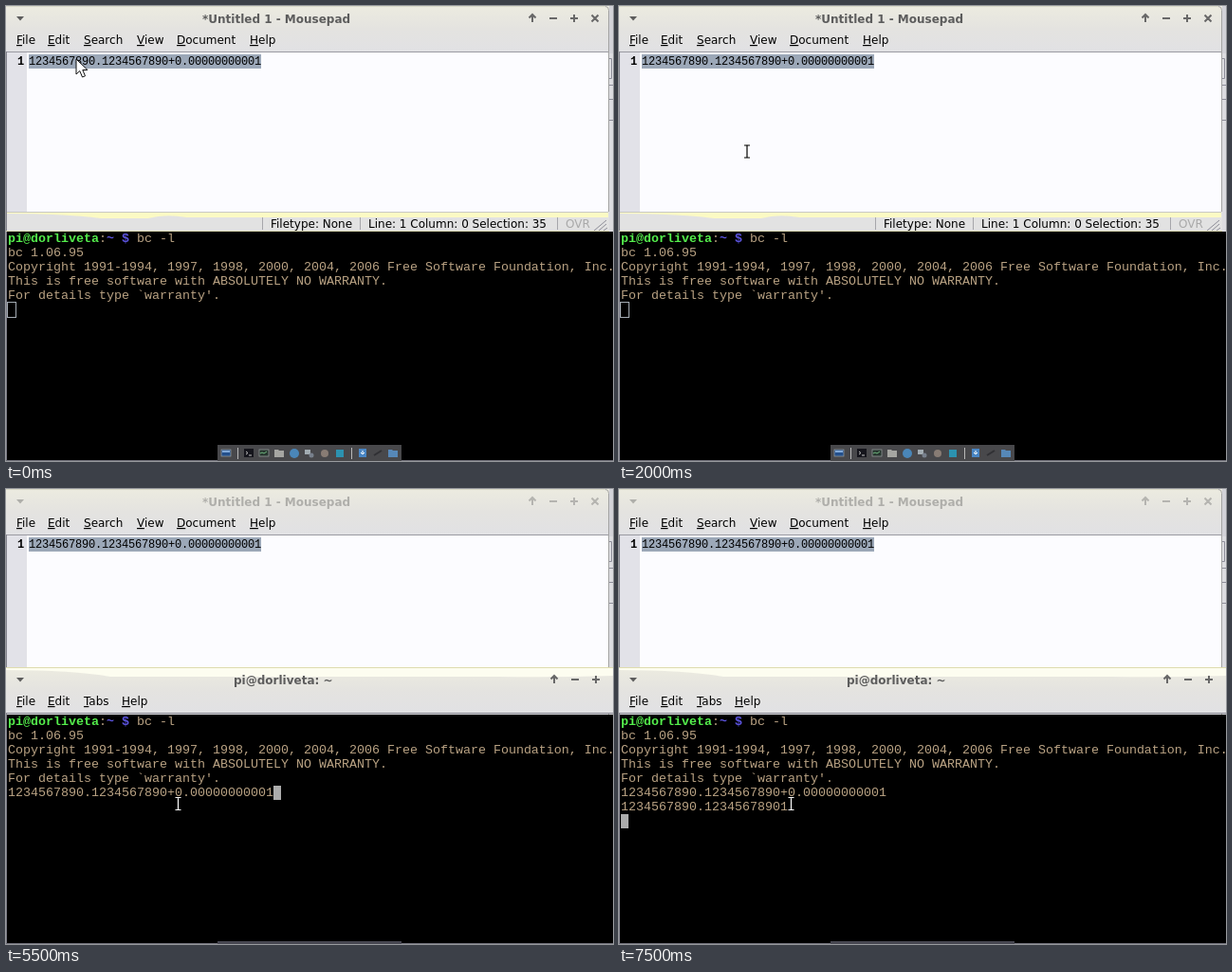
Recreate the animation shown at these times as an HTML page. Size 640 by 480 pixels, loop 8 s.

```html
<!DOCTYPE html>
<html lang="en">
<head>
<meta charset="utf-8">
<title>Copy and paste into bc</title>
<style>
html, body { margin: 0; width: 100%; height: 100%; overflow: hidden; background: #000; }
svg { display: block; width: 640px; height: 480px; }
text { white-space: pre; font: 12px "DejaVu Sans", sans-serif; }
.title { font-weight: bold; }
.mono { font: 13.333px "Liberation Mono", monospace; fill: #b9a283; }
.code { font: 12px "Liberation Mono", monospace; letter-spacing: -.2px; }
.b { font-weight: bold; }
.u { text-decoration: underline; }
.dim { fill: #a9a9a9; }
.sel { fill: #fff; }
</style>
</head>
<body>
<svg id="stage" viewBox="0 0 640 480"></svg>
<script>
const stage = document.getElementById('stage');

const rect = (x, y, w, h, fill, more = '') =>
  `<rect x="${x}" y="${y}" width="${w}" height="${h}" fill="${fill}" ${more}/>`;
const path = (d, fill, more = '') => `<path d="${d}" fill="${fill}" ${more}/>`;
const line = (d, stroke, width = 1) =>
  path(d, 'none', `stroke="${stroke}" stroke-width="${width}"`);
const circle = (x, y, r, fill) => `<circle cx="${x}" cy="${y}" r="${r}" fill="${fill}"/>`;
const text = (x, y, s, cls = '', more = '') =>
  `<text x="${x}" y="${y}" class="${cls}" ${more}>${s}</text>`;
// An underscore marks the underlined shortcut letter.
const label = (x, y, s, cls) => text(x, y, s.replace(/_(.)/, '<tspan class="u">$1</tspan>'), cls);
const group = (id, ...parts) => `<g id="${id}">${parts.join('')}</g>`;
const row = (y, items) => items.map(([x, s]) => label(x, y, s)).join('');

const upArrow = (x, y) => `M${x} ${y + 4}v-8m-3.5 3.5l3.5-3.5 3.5 3.5`;
const minus = (x, y) => `M${x - 4} ${y}h8`;
const plus = (x, y) => `M${x - 4} ${y}h8m-4-4v8`;
const cross = (x, y) => `M${x - 3.5} ${y - 3.5}l7 7m0-7l-7 7`;
const dropDown = y => path(`M11 ${y - 2}h8l-4 4.5z`, '#5c5c5c');

const sum = '1234567890.1234567890+0.00000000001';

function editor() {
  const buttons = upArrow(555, 13) + minus(577, 13) + plus(599, 13) + cross(621, 13);
  return [
    rect(0, 0, 640, 238, '#dcdce0'),
    rect(636, 0, 4, 50, '#d2d2d8'),
    line('M636 55.5h2.5v21H636M636 83.5h4M636 98.5h4M636 120.5h4', '#8c8c98'),
    rect(0, 0, 636, 49, 'url(#bar)'),
    line('M0 .5H632', '#d8d8c8'),
    line('M632 .5q3.5 0 3.5 4V238', '#a4a4a4'),
    group('editorTitle',
      dropDown(13),
      text(207, 18, '*Untitled 1 - Mousepad', 'title', 'fill="#5c5c5c"'),
      line(buttons, '#686868', 2)),
    row(40, [[11, '_File'], [44, '_Edit'], [82, '_Search'], [138, '_View'],
      [180, '_Document'], [257, '_Help']]),
    line('M0 48.5H635', '#9a9aa2'),
    rect(1, 49, 634, 169, '#fcfcff'),
    rect(1, 49, 21, 169, '#e2e2e8'),
    line('M.5 48V238', '#85858f'),
    rect(24, 51, 245, 15, '#9ca8b8'),
    text(12, 62, '1', 'code b'),
    text(24, 62, sum, 'code')
  ].join('');
}

const statusBar = () => [
  rect(1, 217, 635, 21, '#e2e2e2'),
  path('M1 218H635V223H190Q168 219 150 224L100 224Q60 219 1 219z', '#fcfac4'),
  line('M1 217.5H635', '#c8c8c4'),
  line('M270.5 223V236M373.5 223V236M581.5 223V236', '#a6a6aa'),
  text(279, 234, 'Filetype: None'),
  text(382, 234, 'Line: 1 Column: 0 Selection: 35'),
  text(590, 234, 'OVR', 'dim'),
  line('M620 237l13-11M625 237l8-7M630 237l4-3', '#8e8e98'),
  line('M0 237.5H636', '#d8d6b0')
].join('');

const termBar = () => [
  rect(0, 189, 640, 48, 'url(#bar)'),
  path('M0 189H640V197Q580 199 520 198L110 198Q70 191 0 191z', '#fdfdf0'),
  line('M0 188.5H640', '#dedcae'),
  dropDown(201),
  text(240, 206, 'pi@dorliveta: ~', 'title', 'fill="#5c5c5c"'),
  line(upArrow(578, 201) + minus(600, 201) + plus(622, 201), '#686868', 2),
  row(228, [[11, '_File'], [44, '_Edit'], [82, '_Tabs'], [122, '_Help']]),
  line('M0 236.5H640', '#85858f')
].join('');

function terminal() {
  const prompt = '<tspan class="b" fill="#54ee4c">pi@dorliveta</tspan>:' +
    '<tspan class="b" fill="#5c54e0">~ $</tspan> bc -l';
  const lines = [prompt, 'bc 1.06.95',
    'Copyright 1991-1994, 1997, 1998, 2000, 2004, 2006 Free Software Foundation, Inc.',
    'This is free software with ABSOLUTELY NO WARRANTY.',
    "For details type `warranty'."];
  return rect(0, 238, 640, 242, '#000') +
    lines.map((s, i) => text(2, 249 + 15 * i, s, 'mono')).join('') +
    group('pasted', text(2, 324, sum, 'mono')) +
    group('result', text(2, 339, '1234567890.12345678901', 'mono')) +
    line('M.5 238V480', '#7c7c88') + line('M0 479.5H640', '#6c6c76');
}

function dock() {
  const folder = (x, fill) => path(`M${x - 5} 468h4l1 1h5v7h-10z`, fill);
  const screen = (x, fill) => rect(x - 5, 468, 10, 7, fill, 'stroke="#9aa0a0" stroke-width=".7"');
  return [
    rect(223, 463, 194, 17, '#48484b'),
    line('M244.5 466V478M364.5 466V478', '#b8b8b8'),
    screen(232, '#24508c'), rect(228, 469, 8, 2, '#80a8d8'),
    rect(251, 467, 10, 9, '#15151c'), line('M253 470l2 1.5-2 1.5M256 474h3', '#c0c0c0'),
    screen(272, '#26352e'), line('M268 472l2-1 2 1 3-2', '#70b880'),
    folder(288, '#a6a6a2'),
    circle(304, 472, 5, '#4a86b8'),
    rect(315, 468, 6, 5, '#a2acb2'), circle(322, 474, 2.5, '#78808c'),
    circle(336, 472, 4, '#887c74'),
    rect(348, 468, 8, 8, '#2c92b0'),
    rect(372, 467, 8, 9, '#4a86c4'), line('M376 469v4m-2-2l2 2 2-2', '#fff'),
    line('M388 474l8-5', '#303034', 2),
    folder(408, '#5688b8')
  ].join('');
}

function contextMenu() {
  const items = [[67, '_Undo'], [89, '_Redo', 'dim'], [118, 'Cu_t'], [160, '_Paste'],
    [180, 'Paste _Special'], [199, '_Delete'], [228, 'Select _All'],
    [248, 'Change the selection'], [274, 'Conve_rt'], [292, '_Move Selection'],
    [310, 'Duplicate Line / Selection'], [329, '_Increase Indent'], [350, '_Decrease Indent']];
  const page = (x, y, fill) => rect(x, y, 8, 10, fill, 'stroke="#777" stroke-width=".8"');
  const curl = (y, dir, color) =>
    path(`M${85 - 7 * dir} ${y}l${6 * dir}-5v3q${8 * dir} 0 ${8 * dir} 7q${-3 * dir}-3 ${-8 * dir}-3v3z`, color);
  const indent = (y, dir) =>
    line(`M78 ${y - 5}h14M84 ${y - 1}h9M84 ${y + 2}h9M78 ${y + 6}h14`, '#4c4c4c', 2) +
    path(dir > 0 ? `M77 ${y - 3}l6 3.5-6 3.5z` : `M93 ${y - 3}l-6 3.5 6 3.5z`, '#e87820');
  return [
    rect(70.5, 55.5, 223, 308, '#e2e2e0', 'stroke="#82828c"'),
    line('M77 103.5H287M77 213.5H287M77 260.5H287', '#a6a6aa'),
    group('hover', rect(72, 129, 220, 20, '#8898b0')),
    items.map(([y, s, cls]) => label(98, y + 5, s, cls)).join(''),
    `<g id="copyLabel">${label(98, 144, '_Copy')}</g>`,
    [180, 274, 292].map(y => path(`M281 ${y - 5}l6 5-6 5z`, '#000')).join(''),
    curl(67, 1, '#e4a23c'), curl(89, -1, '#bcbcbc'),
    line('M80 111l8 10M90 111l-8 10', '#888', 2),
    circle(81, 122, 2.5, '#c82020'), circle(89, 122, 2.5, '#c82020'),
    page(79, 132, '#fff'), page(83, 136, '#f2f5ee'),
    path('M81 137h4v-3l5 5-5 5v-3h-4z', '#68b02c'),
    rect(78, 153, 13, 14, '#b08a54'), rect(82, 152, 5, 3, '#777'), page(83, 157, '#fff'),
    circle(85, 199, 7.5, '#c41c24'), rect(80, 197, 10, 4, '#fff', 'transform="rotate(35 85 199)"'),
    rect(79, 221, 12, 14, '#f8f8fa', 'stroke="#888"'),
    line('M81 224.5h8M81 227.5h8M81 230.5h8M81 233.5h5', '#53647c'),
    indent(329, 1), indent(350, -1)
  ].join('');
}

const beam = (color, edge) => {
  const d = 'M-3-6.5h2.5l.5.5.5-.5H3M0-6V6M-3 6.5h2.5L0 6l.5.5H3';
  return line(d, edge, 3) + line(d, color, 1.2);
};

stage.innerHTML = `<defs><linearGradient id="bar" x2="0" y2="1">
  <stop stop-color="#ecebe0"/><stop offset=".5" stop-color="#e4e3e0"/>
  <stop offset="1" stop-color="#e1e1e4"/></linearGradient></defs>` + [
  editor(), terminal(),
  group('unfocused', statusBar(), dock(),
    rect(1.5, 312.5, 9, 16, 'none', 'stroke="#a4acb4"')),
  group('focused', termBar(), rect(223, 477, 194, 3, '#464650'),
    group('caret', rect(0, 0, 8, 15, '#acacac'))),
  group('menu', contextMenu()),
  group('arrow', path('M0 0V16l3.8-3.5L6.5 19l3-1.2L6.8 11.5H12z', '#fff', 'stroke="#111"')),
  group('editBeam', beam('#000', '#fff')),
  group('termBeam', beam('#fff', '#000'))
].join('');

const el = id => document.getElementById(id);
const show = (id, on) => el(id).setAttribute('display', on ? 'inline' : 'none');
const move = (id, x, y) => el(id).setAttribute('transform', `translate(${x} ${y})`);

move('editBeam', 135, 153.5);
move('termBeam', 181.5, 332);

function draw(now) {
  const t = now % 8000;
  const copied = t >= 2000, focused = t >= 4000, pasted = t >= 5500, done = t >= 6500;
  const hover = t >= 1000 && !copied;

  show('menu', t >= 500 && !copied);
  show('hover', hover);
  el('copyLabel').firstChild.setAttribute('class', hover ? 'sel' : '');
  show('arrow', !copied);
  move('arrow', ...(hover ? [135, 148] : [74, 56]));
  show('editBeam', copied && !focused);
  show('termBeam', focused);

  show('focused', focused);
  show('unfocused', !focused);
  el('editorTitle').setAttribute('opacity', focused ? .4 : 1);
  show('pasted', pasted);
  show('result', done);
  move('caret', pasted && !done ? 282 : 2, done ? 343 : 313);
  requestAnimationFrame(draw);
}
requestAnimationFrame(draw);
</script>
</body>
</html>
```
